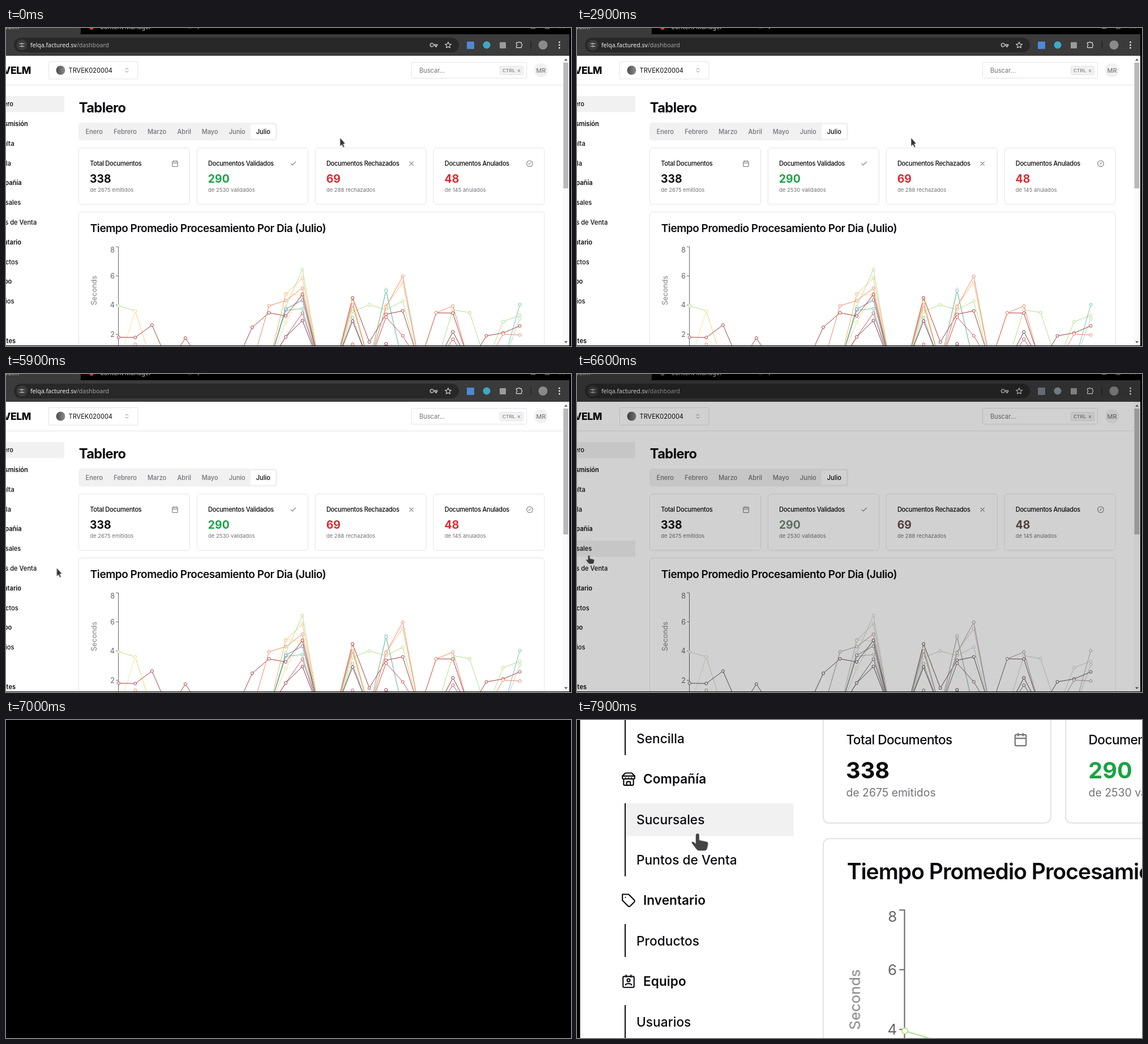
Animation of 998x561 px, one loop 8 s. Source, as an HTML page:

```html
<!DOCTYPE html>
<html lang="es">
<head>
<meta charset="utf-8">
<title>Tablero</title>
<style>
html, body { margin: 0; width: 100%; height: 100%; overflow: hidden; background: #000; }
svg { display: block; width: 100vw; height: 100vh; font-family: Inter, "Noto Sans", sans-serif; animation: fade 8s infinite; }
text { white-space: pre; }
.icon { fill: none; stroke-width: 2; stroke-linecap: round; stroke-linejoin: round; }
.tight { letter-spacing: -.025em; }
.url { font-family: "Noto Sans", "Open Sans", sans-serif; }
.mono { font-family: "Liberation Mono", monospace; }
#cam { animation: cam 8s step-end infinite; }
#pointer { animation: move 8s infinite; }
#arrow { animation: hide 8s step-end infinite; }
#hand, #hover { animation: show 8s step-end infinite; }

@keyframes cam {
  0% { transform: none; }
  87.5%, 100% { transform: translate(171.6px, -456px) scale(2.05); }
}
@keyframes fade {
  0% { filter: brightness(1) grayscale(0); animation-timing-function: step-end; }
  81.25% { filter: brightness(1) grayscale(0); animation-timing-function: step-end; }
  82.5% { filter: brightness(.82) grayscale(.85); animation-timing-function: steps(4); }
  87.5% { filter: brightness(0) grayscale(.85); animation-timing-function: steps(4); }
  92.5% { filter: brightness(.82) grayscale(.85); animation-timing-function: step-end; }
  93.75%, 100% { filter: brightness(1) grayscale(0); }
}
@keyframes move {
  0% { transform: translate(590px, 193.6px); }
  50% { transform: translate(590px, 193.6px); animation-timing-function: steps(4); }
  55% { transform: translate(527.5px, 237.5px); animation-timing-function: steps(15); }
  73.75% { transform: translate(89.5px, 342px); animation-timing-function: steps(4); }
  78.75% { transform: translate(21.3px, 320px); animation-timing-function: step-end; }
  98.75%, 100% { transform: translate(20.3px, 320px); }
}
@keyframes hide { 0% { opacity: 1; } 76.25%, 100% { opacity: 0; } }
@keyframes show { 0% { opacity: 0; } 76.25%, 100% { opacity: 1; } }
</style>
</head>
<body>
<svg viewBox="0 0 998 561" preserveAspectRatio="none">
  <defs>
    <linearGradient id="ball"><stop stop-color="#4a4a4a"/><stop offset="1" stop-color="#8e8e8e"/></linearGradient>
    <clipPath id="view"><rect x="-81" y="300" width="1064" height="260"/></clipPath>
  </defs>
  <g id="cam">
    <rect x="-90" width="1100" height="570" fill="#000"/>
    <rect x="-81" y="49" width="1076" height="511" fill="#fff"/>
    <g id="browser"></g>
    <g id="header"></g>
    <g id="side"></g>
    <g id="main"></g>
    <g id="chart" clip-path="url(#view)"></g>
    <g id="pointer">
      <path id="arrow" d="M0 0V15.2L3.3 12.2 5.7 17.2 8 16.1 5.7 11.2 9.3 10.3Z" fill="#343434" stroke="#e4e4e4" stroke-width=".8"/>
      <path id="hand" d="M-2 1.6a1.8 1.8 0 0 1 3.6 0v4l6 1.2q1.8.5 1.6 2.4l-.7 3.5q-.4 2-2.2 2.4h-5.5q-1.3-.1-2-1.2l-4-5.2q-.8-1.4.6-1.8 1.2-.2 2.6 1.4z" fill="#444" stroke="#fff" stroke-width=".6"/>
    </g>
  </g>
</svg>
<script>
const INK = '#0b0b0e', MUTED = '#73737b', LINE = '#e3e3e6', SOFT = '#f1f1f2';
const put = (id, ...parts) => document.getElementById(id).innerHTML += parts.join('');
const text = (x, y, s, size = 11.06, weight = 400, fill = INK, extra = '') =>
  `<text x="${x}" y="${y}" font-size="${size}" font-weight="${weight}" fill="${fill}" ${extra}>${s}</text>`;
const box = (x, y, w, h, fill, r = 0, stroke = 'none') =>
  `<rect x="${x}" y="${y}" width="${w}" height="${h}" rx="${r}" fill="${fill}" stroke="${stroke}"/>`;
const disc = (x, y, r, fill) => `<circle cx="${x}" cy="${y}" r="${r}" fill="${fill}"/>`;
const path = (d, stroke, width = 1) =>
  `<path d="${d}" fill="none" stroke="${stroke}" stroke-width="${width}"/>`;

// 24-unit icons centred on a point
const icons = {
  calendar: 'M5 4h14a2 2 0 0 1 2 2v14a2 2 0 0 1-2 2H5a2 2 0 0 1-2-2V6a2 2 0 0 1 2-2zM16 2v4M8 2v4M3 10h18',
  check: 'M20 6 9 17l-5-5',
  cross: 'M18 6 6 18M6 6l12 12',
  slash: 'M12 2a10 10 0 1 0 0 20 10 10 0 1 0 0-20M9 15l6-6',
  updown: 'M7 15l5 5 5-5M7 9l5-5 5 5',
  store: 'M2 7l4.4-4.4A2 2 0 0 1 7.8 2h8.4a2 2 0 0 1 1.4.6L22 7M4 12v8a2 2 0 0 0 2 2h12a2 2 0 0 0 2-2v-8M15 22v-4a2 2 0 0 0-2-2h-2a2 2 0 0 0-2 2v4M2 7h20v3a2.5 2 0 0 1-5 0 2.5 2 0 0 1-5 0 2.5 2 0 0 1-5 0 2.5 2 0 0 1-5 0z',
  tag: 'M12 2H2v10l9.3 9.3c.9.9 2.5.9 3.4 0l6.6-6.6c.9-.9.9-2.5 0-3.4zM7 7h.01',
  badge: 'M5 4h14a2 2 0 0 1 2 2v14a2 2 0 0 1-2 2H5a2 2 0 0 1-2-2V6a2 2 0 0 1 2-2zM8 2v3M16 2v3M12 8a2.3 2.3 0 1 0 0 4.6 2.3 2.3 0 1 0 0-4.6M7 18c1-3 9-3 10 0',
  star: 'M12 2l3 6.7 7.2.7-5.4 4.9 1.6 7.2L12 17.7l-6.4 3.8 1.6-7.2L1.8 9.4 9 8.7z',
  key: 'M7 7a5 5 0 1 0 0 10 5 5 0 0 0 4.7-3.5H17V17h3v-3.5h2v-3H11.7A5 5 0 0 0 7 7zM7 12h.01',
  puzzle: 'M4 6h5.5a2.5 2.5 0 1 1 5 0H20v5.5a2.5 2.5 0 1 1 0 5V22H4v-5.5a2.5 2.5 0 0 0 0-5z',
  tune: 'M3 7h5M14 7h7M3 17h7M16 17h5M11 4.5a2.5 2.5 0 1 0 0 5 2.5 2.5 0 1 0 0-5M13 14.5a2.5 2.5 0 1 0 0 5 2.5 2.5 0 1 0 0-5'
};
const icon = (name, x, y, color, k = .527) =>
  `<path class="icon" d="${icons[name]}" stroke="${color}" transform="translate(${x - 12 * k} ${y - 12 * k}) scale(${k})"/>`;

const PALE = '#dedede';
put('browser',
  box(-81, 11, 1076, 38, '#3b3b3b'),
  box(-81, -6, 213, 20, '#3b3b3b', 6),
  text(-2, 2, 'velm', 11, 400, '#ccc', 'class="url"'),
  disc(151, -.5, 3.5, '#e0373c'),
  text(166, 2, 'Content Manager', 11, 400, '#c8c8c8', 'class="url"'),
  path('M322.5-3l4 4M326.5-3l-4 4M339.5-4v6', '#bbb'),
  path('M927 .5h8M952.5-4v5h7v-5M978 1l4-4 4 4', '#999'),
  box(14, 17, 786, 26, '#282828', 13),
  disc(28, 30, 9.5, '#3b3b3b'),
  icon('tune', 28, 30, PALE, .46),
  `<text class="url" x="43" y="34" font-size="10.5" fill="#f0f0f0">felqa.factured.sv<tspan fill="#a0a3a6">/dashboard</tspan></text>`,
  icon('key', 755.5, 30, '#cfcfcf', .62),
  icon('star', 781, 30, PALE, .53),
  box(814, 24, 13, 13, '#4f88d6', 1),
  disc(849, 30, 6.5, '#3fa9c4'),
  box(872, 25, 11, 11, '#9b9b9b', 1),
  icon('puzzle', 906, 29, PALE, .56),
  box(926.5, 23, 1.5, 14, '#222'),
  disc(948.5, 30, 8, '#8a8a8a'),
  [25, 30, 35].map(y => disc(977.5, y, 1.5, PALE)).join(''),
  box(983, 49, 12, 511, '#fafafa'),
  box(984.5, 61, 9, 222, '#b9b9b9'),
  '<path d="M986 57.5l3-3.5 3 3.5zM986 552.5l3 3.5 3-3.5z" fill="#555"/>'
);

put('header',
  path('M-81 100.5H983', LINE),
  text(44, 81, 'QUORVELM', 17.6, 800, INK, 'text-anchor="end" letter-spacing="-.4"'),
  box(75.5, 59.5, 157.5, 30.5, '#fff', 1, LINE),
  disc(96.5, 74.5, 8, 'url(#ball)'),
  text(110.5, 78.5, 'TRVEK020004'),
  icon('updown', 213.5, 74.5, '#77777f', .46),
  box(716.5, 60.5, 203, 28, '#fff', 1, LINE),
  text(730, 78.5, 'Buscar...', 11.06, 400, MUTED),
  box(872.5, 67.5, 41, 15, SOFT, 2, LINE),
  text(877, 77.5, 'CTRL', 9.5, 400, MUTED, 'class="mono"'),
  text(904, 77.5, 'K', 8, 400, MUTED, 'class="mono"'),
  disc(945, 74.5, 12.5, SOFT),
  text(945, 78.5, 'MR', 11, 400, '#66666d', 'text-anchor="middle"')
);

// sidebar: [label, icon] is a heading, a bare string is an entry
const rows = [['Tablero'], ['Transmisión'], 'Consulta', 'Sencilla', ['Compañía', 'store'], 'Sucursales',
  'Puntos de Venta', ['Inventario', 'tag'], 'Productos', ['Equipo', 'badge'], 'Usuarios', '', ['Clientes']];
put('side',
  box(-42, 120, 145, 28.3, SOFT),
  `<g id="hover">${box(-42, 294.1, 145, 28.3, SOFT)}</g>`,
  rows.map((row, i) => {
    const y = 134.1 + i * 34.8;
    if (typeof row === 'string') return text(-32.5, y + 4, row, 11.1, 500);
    const [label, mark] = row;
    return text(-26.6, y + 4, label, 11.06, i ? 600 : 500) + (mark ? icon(mark, -39.3, y, INK) : '');
  }).join(''),
  path('M-42.2 190V252.7M-42.2 294V357M-42.2 398V426.3M-42.2 467.8V531', INK)
);

const months = { Enero: 140.5, Febrero: 190.3, Marzo: 250, Abril: 302.5, Mayo: 345.7, Junio: 393.7, Julio: 441.7 };
const cards = [
  ['Total Documentos', 338, 'de 2675 emitidos', INK, 'calendar'],
  ['Documentos Validados', 290, 'de 2530 validados', '#1aa345', 'check'],
  ['Documentos Rechazados', 69, 'de 288 rechazados', '#dc2a2e', 'cross'],
  ['Documentos Anulados', 48, 'de 145 anulados', '#dc2a2e', 'slash']
];
put('main',
  text(128.7, 148.7, 'Tablero', 23.7, 700, INK, 'class="tight"'),
  box(128, 167, 351, 31.5, SOFT, 5),
  box(432, 170, 44, 25.5, '#fff', 3),
  Object.entries(months).map(([m, x]) => text(x, 187, m, 11.06, 500, m === 'Julio' ? INK : MUTED)).join(''),
  cards.map(([title, n, note, color, mark], i) => {
    const x = 128.5 + i * 208.85;
    return box(x, 211.8, 196, 99.3, '#fff', 5, LINE) +
      text(x + 19.7, 243.2, title, 11.06, 500, INK, 'class="tight"') +
      text(x + 19.5, 272.8, n, 19.4, 700, color) +
      text(x + 19.7, 288.5, note, 9.48, 400, MUTED) +
      icon(mark, x + 170, 239.3, MUTED);
  }).join('')
);

const AXIS = '#666';
put('chart',
  box(128.5, 324.5, 822.5, 300, '#fff', 5, LINE),
  text(148.8, 359.6, 'Tiempo Promedio Procesamiento Por Dia (Julio)', 19.02, 600, INK, 'class="tight"'),
  path('M194 386H198.5V592', AXIS),
  [[8, 391.5], [6, 437.3], [4, 488.7], [2, 540.3]].map(([n, y], i) =>
    (i ? path(`M194 ${y}h4.5`, AXIS) : '') + text(192, y + 4.6, n, 12.64, 400, AXIS, 'text-anchor="end"')).join(''),
  text(0, 0, 'Seconds', 12.64, 400, '#808080', 'text-anchor="middle" transform="translate(160 463) rotate(-90)"')
);

// each run is [first day, height, height, ...]; other days rest at zero
function series(color, ...runs) {
  const ys = Array(25).fill(592);
  for (const [day, ...run] of runs) run.forEach((y, i) => ys[day + i] = y);
  const pts = ys.map((y, i) => [+(198.8 + i * 29.53).toFixed(1), y]);
  put('chart', path('M' + pts.join('L'), color),
    pts.map(([x, y]) => `<circle cx="${x}" cy="${y}" r="2.5" fill="#fff" stroke="${color}"/>`).join(''));
}
series('#f5d985', [10, 519, 469]);
series('#b2df8a', [0, 490, 499], [10, 492, 426], [14, 500, 488.5, 497, 482], [20, 497, 502], [23, 518, 507]);
series('#fbe29a', [1, 499], [10, 468, 472], [14, 479]);
series('#c3cfc4', [16, 461], [24, 513]);
series('#72c3a8', [10, 498, 495], [14, 511], [16, 464], [24, 488]);
series('#5b83bb', [10, 496, 480]);
series('#a63c40', [0, 545.5, 546, 524], [4, 547], [8, 528, 502.5, 508, 470], [14, 476, 554, 505, 499], [19, 502.5, 503], [22, 543, 538, 525.5]);
series('#f8bb78', [10, 470, 441], [14, 484], [16, 490, 449]);
series('#e98a6a', [1, 558], [9, 490, 481, 459], [14, 489], [16, 492, 438], [19, 502.5, 490.5], [23, 540, 541.5]);
series('#7a3345', [10, 545, 516], [14, 517], [16, 557], [20, 536]);
series('#c4525c', [10, 545, 503], [14, 558], [16, 510, 543], [20, 549]);
</script>
</body>
</html>
```
